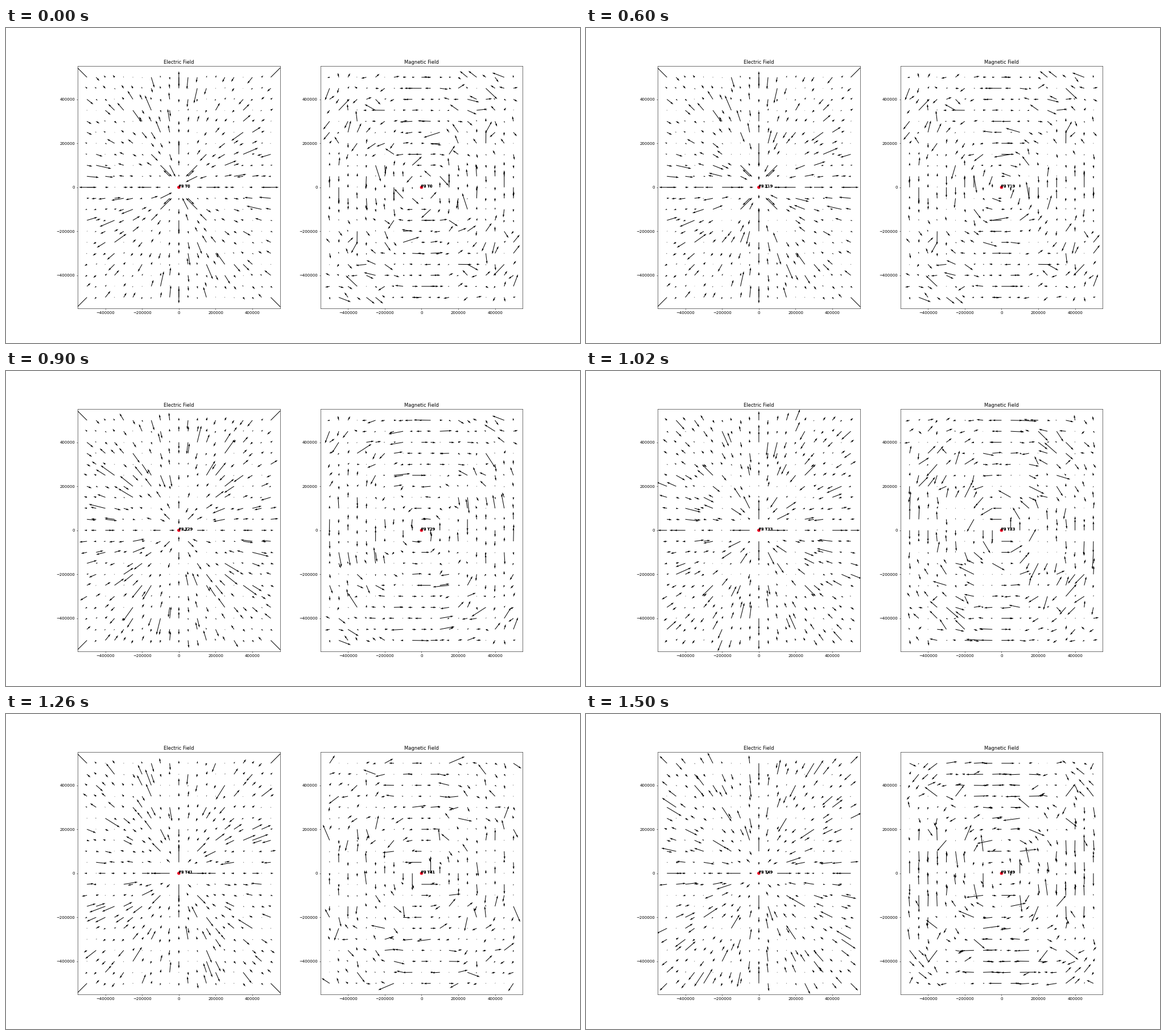
Recreate the animation shown at these times as a matplotlib script. Size 1009 px wide and 555 px high, loop 1530 ms.

```python
import numpy as np
import matplotlib.pyplot as plt
from matplotlib.animation import FuncAnimation

STEPS = 50
CELL = 50_000
HALF = 10
PARTICLES = 4
WAVE_SPEED = 30_000   # metres per step
WAVE_START = 8

cells = np.arange(-HALF, HALF + 1)
gx, gy = np.meshgrid(cells, cells)
radius = np.hypot(gx, gy)
angle = np.arctan2(gy, gx)

# The field repeats every quarter turn: fold each grid point into the
# quadrant i > 0, j >= 0.
fold_i, fold_j = gx.copy(), gy.copy()
for _ in range(3):
    outside = ~((fold_i > 0) & (fold_j >= 0))
    fold_i, fold_j = (np.where(outside, fold_j, fold_i),
                      np.where(outside, -fold_i, fold_j))


def random_lengths(rng):
    """Signed arrow lengths in pixels for one quadrant."""
    shape = (HALF + 1, HALF + 1)
    lengths = np.minimum(rng.gamma(1.4, 6.7, shape), 30)
    return lengths * rng.choice([-1, 1], shape)


def random_field(seed):
    """Radial strength, tangential strength and tangential tilt per point."""
    rng = np.random.default_rng(seed)
    electric, magnetic = random_lengths(rng), random_lengths(rng)
    magnetic[:, :2] = electric[:, :2]   # both agree close to the axes
    tilt = rng.normal(0, 0.6, electric.shape)
    return np.array([np.where(radius > 0, part[fold_i, fold_j], 0)
                     for part in (electric, magnetic, tilt)])


START = random_field(0)


def polar(length, direction):
    return length * np.cos(direction), length * np.sin(direction)


def fields(step):
    reached = radius * CELL < WAVE_SPEED * (step - WAVE_START)
    electric, magnetic, tilt = np.where(reached, random_field(100 + step), START)
    # Tangential arrows lean towards the nearer axis direction.
    tangent = angle + np.pi / 2 - 0.2 * np.sin(4 * angle)
    tangent += tilt * np.sin(2 * angle) ** 2
    return polar(electric, angle), polar(magnetic, tangent)


fig, axes = plt.subplots(1, 2, figsize=(20.18, 11.1), dpi=50)
fig.subplots_adjust(top=0.8785)
quivers, labels = [], []
ticks = np.arange(-400_000, 400_001, 200_000)
for ax, title in zip(axes, ("Electric Field", "Magnetic Field")):
    ax.set(title=title, xlim=(-550_000, 550_000), ylim=(-550_000, 550_000),
           xticks=ticks, yticks=ticks)
    quivers.append(ax.quiver(gx * CELL, gy * CELL, 0 * gx, 0 * gy,
                             scale=1, scale_units="dots"))
    ax.scatter([0, 0], [0, 0], s=42, c=["red", "#f00428"], zorder=3)
    labels.append([ax.text(0, 0, "", zorder=4) for _ in range(PARTICLES)])


def update(frame):
    step = max(frame - 1, 0)   # the first step is held for two frames
    for quiver, (u, v), texts in zip(quivers, fields(step), labels):
        quiver.set_UVC(u, v)
        for n, text in enumerate(texts):
            text.set_text(f"P{n} T{step}")
    return quivers + labels[0] + labels[1]


anim = FuncAnimation(fig, update, frames=STEPS + 1, interval=30,
                     repeat=True, repeat_delay=0)
plt.show()
```
